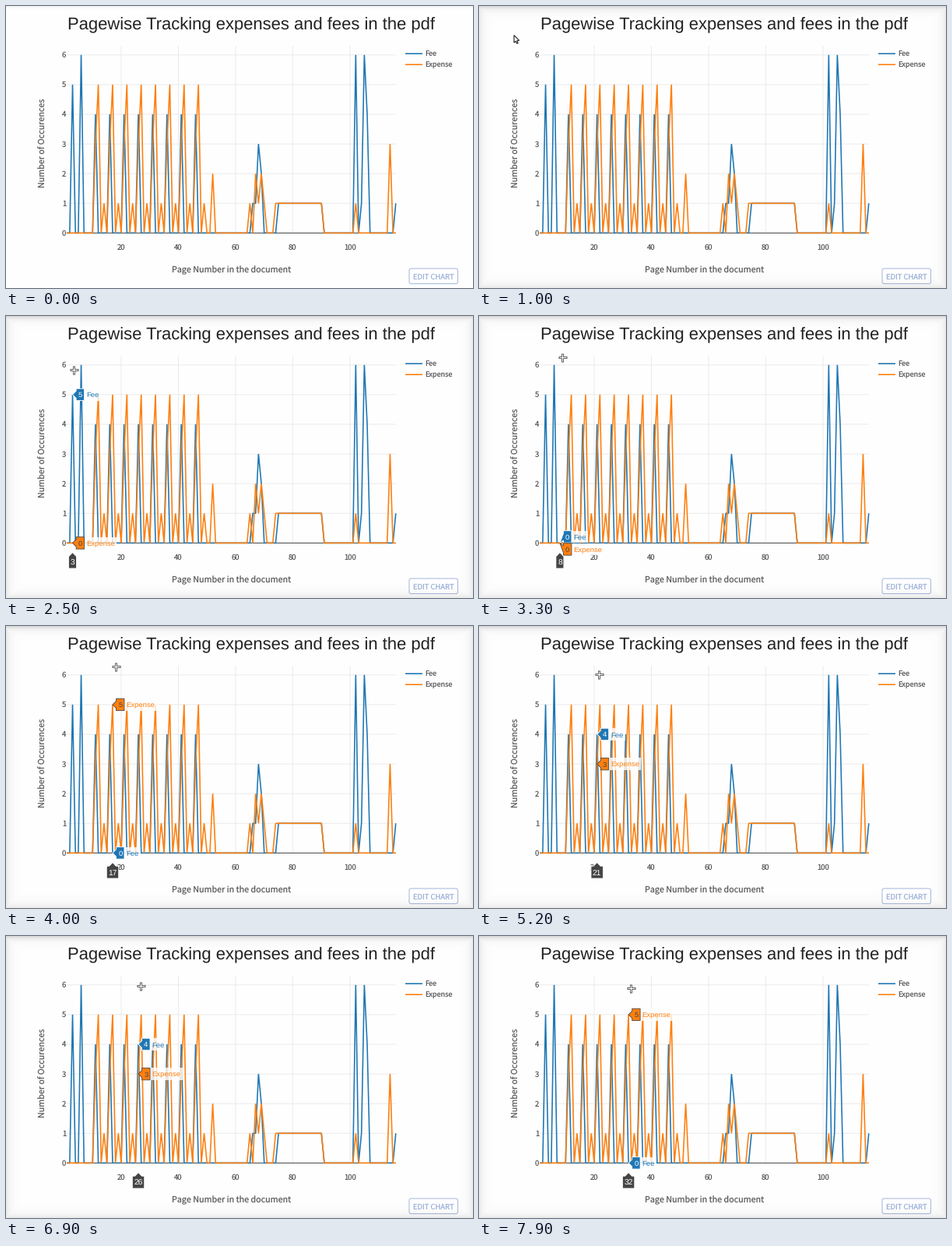
A matplotlib script for the animation above (8 s loop, 600x362 px).

```python
import numpy as np
import matplotlib.pyplot as plt
from matplotlib.animation import FuncAnimation
from matplotlib.patches import Polygon, Rectangle, FancyBboxPatch

plt.rcParams["text.hinting"] = "no_hinting"

W, H, DPI = 600, 362, 100
STEP, FRAMES = 100, 80
PT = 72 / DPI
BLUE, ORANGE, DARK, SOFT = "#1f77b4", "#ff7f0e", "#444444", "#5c5c5c"
SANS, ARIAL = "Noto Sans CJK JP", "Liberation Sans"
LEFT, RIGHT, TOP = 78, 501, 51

fig = plt.figure(figsize=(W / DPI, H / DPI), dpi=DPI, facecolor="#fefefe")
ax = fig.add_axes([0, 0, 1, 1])
ax.axis("off")


def px(page):
    return 148 + 3.675 * (page - 20)


def page_at(x):
    return round(20 + (x - 148) / 3.675)


def py(count):
    return 291.4 - 38.1 * count


def text(x, cy, s, size, color=SOFT, font=SANS, ha="left", z=3):
    """Text whose capitals are centred on cy; size in pixels."""
    return ax.text(x, cy + 0.36 * size, s, fontsize=size * PT, color=color,
                   family=font, ha=ha, va="baseline", zorder=z)


def stroke(xs, ys, color, width, z):
    ax.plot(xs, ys, color=color, lw=width * PT, zorder=z, snap=False,
            solid_joinstyle="bevel", solid_capstyle="butt")


# ---- data: counts per page --------------------------------------------
fee, expense = np.zeros((2, 117))
fee[11:47:5] = 4
for k, count in enumerate((3, 5, 0, 1)):
    expense[11 + k:47 + k:5] = count
fee[[3, 6]] = 5, 6
fee[66:70] = 1, 1, 3, 2
fee[102:107] = 6, 0, 1, 6, 4
fee[75:91] = expense[74:91] = 1
fee[116] = 1
expense[65:71] = 1, 0, 2, 1, 2, 1
expense[[52, 102, 114]] = 2, 1, 3
SERIES = (("Fee", fee, BLUE, "white"), ("Expense", expense, ORANGE, DARK))

# ---- static chart -----------------------------------------------------
text(79, 22.5, "Pagewise Tracking expenses and fees in the pdf", 21.97,
     "#222222", ARIAL)
for p in range(20, 101, 20):
    stroke([px(p)] * 2, [TOP, py(0)], "#ebebeb", 1, 1)
    text(px(p), 309.8, str(p), 9.5, ha="center")
for n in range(7):
    stroke([LEFT, RIGHT], [py(n)] * 2, "#ebebeb" if n else DARK, 1, 1.5)
    text(77.3, py(n), str(n), 9.5, ha="right")

pages = np.arange(1, 117)
for k, (name, counts, color, _) in enumerate(SERIES):
    stroke(px(pages), py(counts[1:]), color, 1.6, 2 + k)
    y = 61.2 + 14 * k
    stroke([513, 535], [y, y], color, 1.6, 3)
    text(538.3, y + 0.4, name, 9.1)

text(289.5, 338.9, "Page Number in the document", 10.75, ha="center")
ax.text(51.2, 176, "Number of Occurences", fontsize=10.75 * PT, color=SOFT,
        family=SANS, rotation=90, rotation_mode="anchor", ha="center",
        va="baseline", zorder=3)

ax.add_patch(FancyBboxPatch((519.5, 338.5), 59.5, 16.5, fc="white", ec="#a8bade",
                            boxstyle="round,pad=1.5,rounding_size=2.5",
                            lw=0.75, zorder=3))
text(549, 347, "EDIT CHART", 9.4, "#9fb3da", ha="center", z=4)

# ---- edge shading -----------------------------------------------------
yy, xx = np.mgrid[0:H, 0:W] + 0.5


def shade(alpha):
    rgba = np.zeros((H, W, 4))
    rgba[..., 3] = alpha
    return ax.imshow(rgba, extent=(0, W, H, 0), aspect="auto", zorder=5,
                     interpolation="nearest")


shade(0.06 * np.exp(-yy / 2))
side = np.minimum(np.minimum(xx, W - xx), H - yy)
vignette = shade(np.maximum(0.13 * np.exp(-yy / 5), 0.09 * np.exp(-side / 6)))
ax.set_xlim(0, W)
ax.set_ylim(H, 0)

# ---- motion: time, x, y of the pointer ---------------------------------
PATH = np.array([
    (500, -10, 20), (1000, 45, 37.5), (1800, 81, 69), (2500, 86.8, 69),
    (3300, 106.7, 52.8), (3900, 140, 52), (4600, 148, 51), (4900, 157, 60),
    (5200, 154, 61.5), (5600, 154, 61.5), (6900, 173, 64), (7200, 180, 64),
    (7400, 180, 64), (7700, 201, 66), (7900, 194.5, 66.5)])
ARROW = np.array([(0, 0), (0, 9.6), (2.2, 7.6), (3.7, 10.8), (5.2, 10.1),
                  (3.8, 7), (6.6, 6.8)])
live = []


def shape(points, fc, ec, z, lw=0.6):
    live.append(ax.add_patch(Polygon(points, fc=fc, ec=ec, lw=lw, zorder=z,
                                     joinstyle="miter")))


def flag(x, y, cy, value, name, color, ink):
    """Value box pointing at (x, y), with the series name beside it."""
    half, tip, end = 7.7, x + 4.6, x + 15
    label = text(x + 17.2, cy, name, 9.5, color, ARIAL, z=8)
    box = label.get_window_extent()
    live.append(ax.add_patch(Rectangle((end, cy - half), box.width + 4.8, 2 * half,
                                       fc="white", alpha=0.8, lw=0, zorder=6)))
    shape([(x, y), (tip, cy + 4.6), (tip, cy + half), (end, cy + half),
           (end, cy - half), (tip, cy - half), (tip, cy - 4.6)], color, ink, 7)
    live.extend([label, text(x + 9.8, cy, f"{value:.0f}", 9.5, ink, ARIAL,
                             "center", 8)])


def hover(page):
    x, ys = px(page), [py(counts[page]) for _, counts, _, _ in SERIES]
    push = max(0, 16 - abs(ys[0] - ys[1])) / 2
    first_up = -1 if ys[0] <= ys[1] else 1
    for y, sign, (name, counts, color, ink) in zip(ys, (first_up, -first_up), SERIES):
        flag(x, y, y + sign * push, counts[page], name, color, ink)
    half = 2.3 + 2.7 * len(str(page))
    shape([(x, 303.6), (x + 4.4, 308.2), (x + half, 308.2), (x + half, 324),
           (x - half, 324), (x - half, 308.2), (x - 4.4, 308.2)], DARK, "white", 7)
    live.append(text(x, 316.2, str(page), 10.2, "white", ARIAL, "center", 8))


def crosshair(x, y):
    for size, width, color in ((11, 3, "#5a5a5a"), (9, 1.1, "white")):
        live.extend(ax.plot(x, y, "+", ms=size * PT, mew=width * PT, mec=color,
                            zorder=9))


def draw(i):
    t = i * STEP
    while live:
        live.pop().remove()
    vignette.set_alpha(min(t / 900, 1))
    x, y = (np.interp(t, PATH[:, 0], PATH[:, k]) for k in (1, 2))
    if x < LEFT:
        shape(ARROW + (x, y), "white", "#222222", 9, 0.8)
    else:
        if y > TOP + 0.6:
            hover(page_at(x - 2.5))
        crosshair(x, y)
    return live


anim = FuncAnimation(fig, draw, frames=FRAMES, interval=STEP, init_func=lambda: draw(0),
                     repeat=True, repeat_delay=0, blit=False)
plt.show()
```
